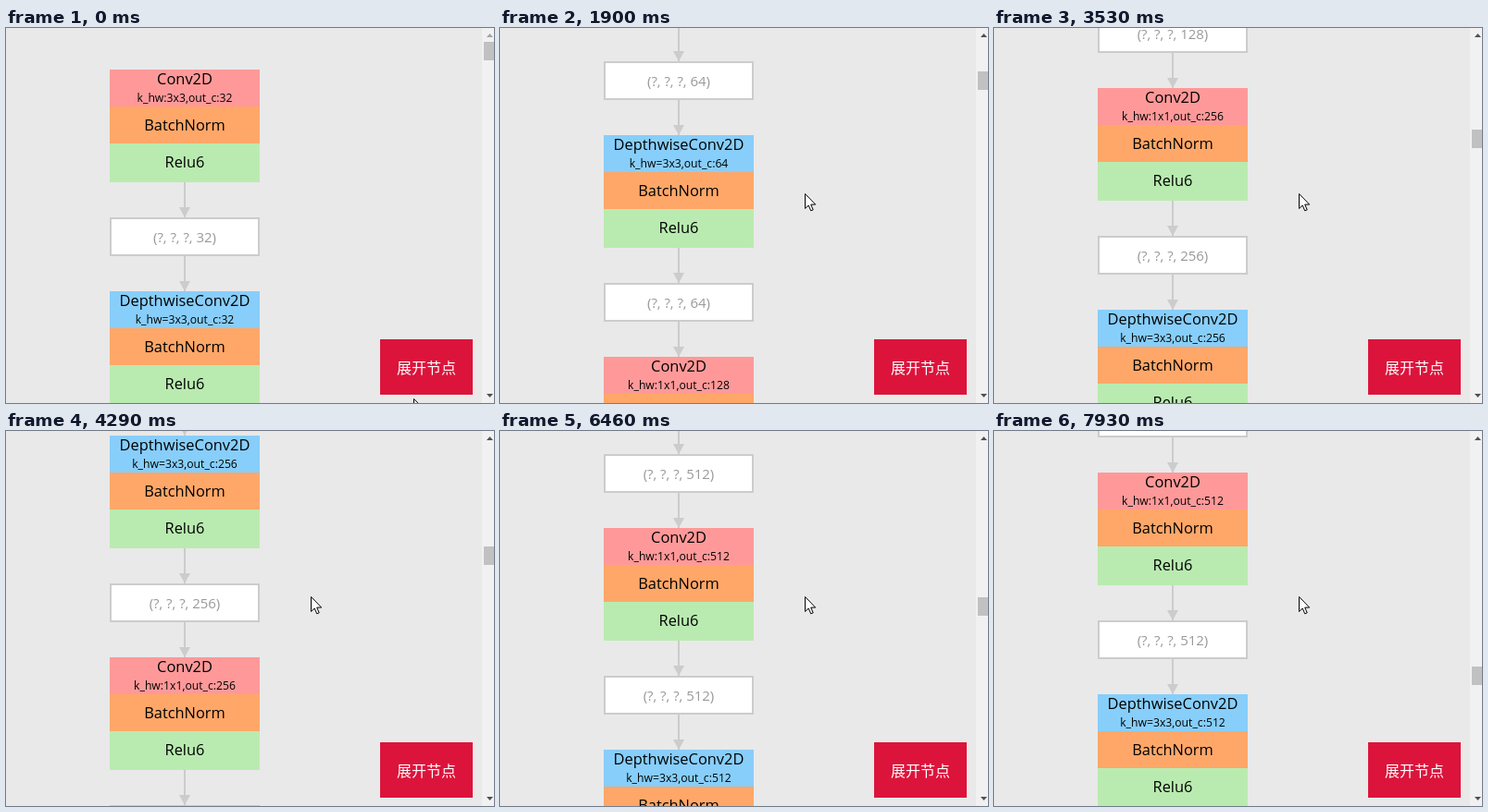
An HTML page for the animation above (8000 ms loop, 527 by 406 pixels).

```html
<!DOCTYPE html>
<html lang="zh">
<head>
<meta charset="utf-8">
<title>Network graph</title>
<style>
  html, body { margin: 0; width: 100%; height: 100%; overflow: hidden; }
  body { position: relative; background: #e9e9e9; font: 16.4px "Open Sans", "Noto Sans", sans-serif; color: #000; }
  div, svg { position: absolute; box-sizing: border-box; white-space: nowrap; }
  #graph { left: 112px; top: 45px; width: 162px; text-align: center; }
  .layer { left: 0; width: 162px; height: 240px; }
  .row { left: 0; width: 162px; height: 40px; line-height: 40px; }
  .conv { background: #ff9999; }
  .depth { background: #87cefa; }
  .title, .param { left: 0; width: 162px; height: 20px; line-height: 20px; }
  .param { top: 20px; line-height: 22px; font-size: 12.2px; }
  .norm { top: 40px; background: #ffa768; }
  .relu { top: 80px; height: 42px; background: #b9ebb0; }
  .shape { top: 160px; left: 0; width: 162px; height: 42px; line-height: 38px;
           border: 2px solid #ccc; background: #fff; color: #999; font-size: 15px; }
  .arrow { left: 80px; width: 2px; height: 38px; background: #ccc; }
  .arrow::after { content: ""; position: absolute; left: -5px; bottom: 0;
                  border: 6px solid transparent; border-top: 11px solid #ccc; border-bottom: 0; }
  #button { left: 404px; top: 337px; width: 100px; height: 60px; background: #dc143c; color: #fff;
            font: 16px/60px "Noto Sans CJK SC", "Noto Sans CJK", sans-serif; text-align: center; }
  #bar { left: 514px; top: 0; width: 13px; height: 406px; background: #f1f1f1; overflow: hidden; }
  #thumb { left: 2px; top: 15px; width: 13px; height: 20px; background: #c1c1c1; }
  #bar svg, #cursor { left: 0; top: 0; overflow: visible; }
</style>
</head>
<body>
<div id="graph"></div>
<div id="button">展开节点</div>
<div id="bar">
  <svg width="13" height="406">
    <path id="up" d="M5 10h7l-3.5-4z"/>
    <path d="M5 396h7l-3.5 4z" fill="#505050"/>
  </svg>
  <div id="thumb"></div>
</div>
<svg id="cursor" width="13" height="20">
  <path d="M.5.5v16l3.7-3.5 2.5 5.8 2.5-1-2.5-5.7h5z" fill="#fff" stroke="#000"/>
</svg>
<script>
const LOOP = 8000, STEP = 240;
const channels = [32, 32, 64, 64, 128, 128, 128, 128, 256, 256, 256, 256].concat(Array(11).fill(512));

// Wheel bursts: first step, last step, steps, target, ease power
const bursts = [
  [660, 960, 5, 200], [1270, 1650, 6, 500], [1820, 2050, 4, 800, 1.005], [2200, 2430, 4, 1000],
  [2660, 2830, 3, 1300, 1.6], [2980, 3220, 4, 1600], [3380, 3530, 3, 1900],
  [3990, 4290, 5, 2200], [4600, 4950, 5, 2400], [5210, 5380, 3, 2700, 1.15], [5530, 5680, 3, 3000],
  [6080, 6460, 6, 3300], [6540, 6770, 4, 3700], [6920, 7160, 4, 4100],
  [7390, 7560, 3, 4400], [7700, 7930, 4, 4800]
];

const $ = id => document.getElementById(id);
const smooth = u => u * u * (3 - 2 * u);

function layer(c, i) {
  const depth = i % 2;
  const name = depth ? "DepthwiseConv2D" : "Conv2D";
  const kernel = depth ? "=3x3" : i ? ":1x1" : ":3x3";
  return `<div class="layer" style="top:${i * STEP}px">
    <div class="row ${depth ? "depth" : "conv"}">
      <div class="title">${name}</div><div class="param">k_hw${kernel},out_c:${c}</div>
    </div>
    <div class="row norm">BatchNorm</div><div class="row relu">Relu6</div>
    <div class="arrow" style="top:122px"></div>
    <div class="shape">(?, ?, ?, ${c})</div>
    <div class="arrow" style="top:202px"></div>
  </div>`;
}
$("graph").innerHTML = channels.map(layer).join("");

// Share of the steps already taken, from 0 to 1
function progress(t, first, last, steps) {
  if (t < first) return 0;
  const gap = (last - first) / (steps - 1);
  return Math.min(steps, Math.floor((t - first) / gap + 1.02)) / steps;
}

function scrollAt(t) {
  let pos = 0;
  for (const [first, last, steps, target, power = 1.1] of bursts) {
    if (t < first) break;
    pos += (target - pos) * smooth(progress(t, first, last, steps) ** power);
  }
  return Math.round(pos);
}

function draw(now) {
  const t = now % LOOP;
  const y = scrollAt(t);
  $("graph").style.transform = `translateY(${-y}px)`;
  $("thumb").style.transform = `translateY(${Math.round(y / 20)}px)`;
  $("up").setAttribute("fill", y ? "#505050" : "#a3a3a3");
  const k = smooth(progress(t, 70, 260, 4));
  $("cursor").style.transform =
    `translate(${Math.round(440 - 111 * k)}px, ${Math.round(401 - 222 * k)}px)`;
}

const start = performance.now();
function tick() {
  draw(performance.now() - start);
  requestAnimationFrame(tick);
}
tick();
</script>
</body>
</html>
```
